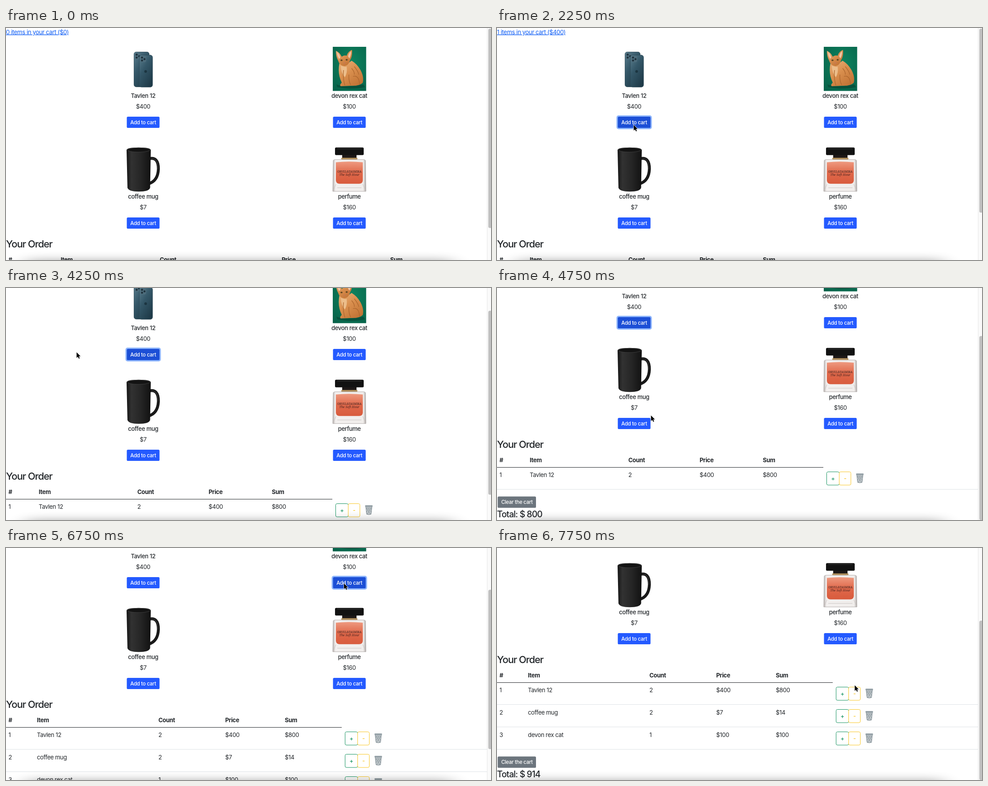
Recreate the animation shown at these times as an HTML page. Size 1082 by 518 pixels, loop 8000 ms.

```html
<!DOCTYPE html>
<html lang="en">
<head>
<meta charset="utf-8">
<title>Shop cart</title>
<style>
  html, body { margin: 0; width: 100%; height: 100%; overflow: hidden; background: #fff; }
  svg { display: block; }
  text { font: 13.1px Inter, sans-serif; letter-spacing: -.028em; fill: #212529; }
  .mid { text-anchor: middle; }
  .item { font-weight: 500; }
  .head { font-weight: 700; }
  .link { fill: #0d5cf5; text-decoration: underline; }
  .label { font-size: 11.5px; font-weight: 500; fill: #fff; text-anchor: middle; }
  .title { font-size: 22px; font-weight: 550; letter-spacing: -.05em; }
  .total { font-size: 19.4px; font-weight: 550; letter-spacing: -.045em; }
  .brand { font: 6.4px "Noto Serif", serif; letter-spacing: 0; fill: #3c2320; text-anchor: middle; }
  .script { font: italic 7px "Noto Serif", serif; letter-spacing: 0; fill: #4a2420; text-anchor: middle; }
</style>
</head>
<body>
<svg id="stage" width="1082" height="518" viewBox="0 0 1082 518">
  <defs>
    <linearGradient id="phoneFill" x2=".7" y2="1">
      <stop stop-color="#5a7d8d"/><stop offset=".45" stop-color="#345768"/><stop offset="1" stop-color="#1f3b49"/>
    </linearGradient>
    <radialGradient id="wall" cx=".55" cy=".4" r=".8">
      <stop stop-color="#0e8560"/><stop offset="1" stop-color="#066048"/>
    </radialGradient>
    <linearGradient id="fur" x2=".7" y2="1">
      <stop stop-color="#e9b27b"/><stop offset=".5" stop-color="#d98f4e"/><stop offset="1" stop-color="#c27436"/>
    </linearGradient>
    <linearGradient id="mugFill">
      <stop stop-color="#151515"/><stop offset=".2" stop-color="#323232"/>
      <stop offset=".6" stop-color="#252525"/><stop offset="1" stop-color="#111"/>
    </linearGradient>
    <linearGradient id="glass">
      <stop stop-color="#b5afad"/><stop offset=".08" stop-color="#f3f0ef"/>
      <stop offset=".92" stop-color="#f0edeb"/><stop offset="1" stop-color="#aaa5a3"/>
    </linearGradient>
    <linearGradient id="liquid" x2="0" y2="1">
      <stop stop-color="#ee9a80"/><stop offset=".5" stop-color="#e0694b"/><stop offset="1" stop-color="#d85b3d"/>
    </linearGradient>
    <filter id="blur" x="-20%" y="-200%" width="140%" height="500%"><feGaussianBlur stdDeviation="22 10"/></filter>

    <g id="phone">
      <rect x="16.500" y="11.500" width="34" height="78" rx="5" fill="url(#phoneFill)" stroke="#2b4754" stroke-width=".8"/>
      <rect x="18.500" y="14" width="13" height="14" rx="4" fill="#4d6c7b"/>
      <g fill="#1d303b"><circle cx="22.500" cy="17.500" r="2.300"/><circle cx="22.500" cy="24" r="2.300"/><circle cx="28" cy="21" r="2.300"/></g>
      <rect x="28.500" y="18.500" width="29.500" height="71.500" rx="5" fill="url(#phoneFill)" stroke="#2b4754" stroke-width=".8"/>
      <rect x="30.500" y="20.500" width="13" height="14" rx="4" fill="#4d6c7b"/>
      <g fill="#1d303b"><circle cx="34.500" cy="24" r="2.300"/><circle cx="34.500" cy="30.500" r="2.300"/><circle cx="40" cy="27.500" r="2.300"/></g>
      <circle cx="42.500" cy="55" r="3" fill="#1c3541"/>
    </g>

    <g id="cat">
      <rect width="74.500" height="98.500" fill="url(#wall)"/>
      <path d="M8 84 Q30 92 68 84 L72 90 Q40 97 10 90Z" fill="#07523d"/>
      <path d="M15 36 Q30 42 42 31 Q54 38 62 52 Q70 67 67 80 Q60 88 40 87 L18 88 Q14 86 20 80 Q10 60 15 36Z" fill="url(#fur)"/>
      <path d="M18 42 Q28 46 31 44 Q33 58 27 68 Q18 58 18 42Z" fill="#ecbd8a"/>
      <path d="M24 52 Q22 70 27 86 M36 62 Q35 76 40 85 M45 66 Q58 62 60 84 M48 44 Q57 55 58 62 M42 48 Q49 56 48 62" fill="none" stroke="#ad662e" stroke-width="1.300"/>
      <path d="M7 9 Q15 12 20 22 Q25 18 31 20 Q34 10 43 7 Q44 22 39 29 Q36 41 26 43 Q15 42 12 31 Q7 22 7 9Z" fill="url(#fur)"/>
      <path d="M9.500 12 Q15 16 17 24 L14 27 Q10 20 9.500 12Z M41 10 Q36 13 34 21 L37 26 Q41 20 41 10Z" fill="#f0c6a7"/>
      <ellipse cx="19.500" cy="30" rx="2.400" ry="1.800" fill="#5b4420"/>
      <ellipse cx="31" cy="29" rx="2.400" ry="1.800" fill="#5b4420"/>
      <path d="M24 35 L28 35 L26 38Z" fill="#c6755e"/>
    </g>

    <g id="mug">
      <path d="M50 25 Q71 20 71 48 Q70 75 49 81" fill="none" stroke="#191919" stroke-width="6.500"/>
      <path d="M55 24.500 Q70 24 70 48" fill="none" stroke="#444"/>
      <path d="M0 6 Q0 0 27 0 Q54 0 54 6 L52.500 90 Q50 98.500 27 98.500 Q5 98.500 2 90Z" fill="url(#mugFill)"/>
      <ellipse cx="27" cy="5.500" rx="25.500" ry="4.800" fill="#131313" stroke="#444" stroke-width=".8"/>
    </g>

    <g id="perfume">
      <rect x="21" y="15" width="32" height="13" fill="#1d1817"/>
      <rect x="19" y="23" width="36" height="4" rx="1" fill="#b4925c"/>
      <rect x="5" width="64" height="17" rx="2.500" fill="#121212"/>
      <path d="M10 3 H64" stroke="#3a3a3a"/>
      <path d="M1 29 Q2 27 6 27 H68 Q72 27 73 29 L74 98 H0Z" fill="url(#glass)" stroke="#a49e9c" stroke-width=".8"/>
      <path d="M7 33 Q37 30 67 33 V74 Q66 81 59 81 H15 Q8 81 7 74Z" fill="url(#liquid)"/>
      <path d="M7 82 L1 97 M67 82 L73 97 M10 90 H64" stroke="#cbc5c3" fill="none"/>
      <text class="brand" x="37" y="56">ORVEL&amp;TASMIRA</text>
      <text class="script" x="37" y="63">The Soft Hour</text>
    </g>

    <g id="bin">
      <path d="M1.500 3 H15.500 L13.500 20 Q8.500 22 3.500 20Z" fill="#c3cacd" stroke="#77858c"/>
      <path d="M3 5 L12 20 M7 5 L14 16 M11 5 L14.500 10 M14 5 L5 20 M10 5 L3 16 M6 5 L2.500 10" stroke="#77858c" stroke-width=".8"/>
      <rect width="17" height="3.500" rx="1.500" fill="#96a2a8"/>
    </g>
  </defs>

  <g id="page"></g>
  <rect x="45" y="518" width="950" height="30" fill="#000" opacity=".3" filter="url(#blur)"/>
  <rect x="1074" width="8" height="518" fill="#fafafa"/>
  <path d="M1073.500 0 V518" stroke="#e6e6e6"/>
  <rect id="thumb" x="1076" width="9" rx="3.500" fill="#c1c1c1"/>
  <path id="cursor" d="M0 0 V12.500 L2.900 9.900 L5 14.300 L7 13.400 L5 9.100 H8.800Z" fill="#000" stroke="#fff" stroke-width="1.400" paint-order="stroke"/>
</svg>

<script>
const LOOP = 8000, VIEW = 518, ROW = 50;
const byId = id => document.getElementById(id);

const products = [
  { name: 'Tavlen 12', price: 400, art: 'phone', x: 306, y: 42 },
  { name: 'devon rex cat', price: 100, art: 'cat', x: 766, y: 42 },
  { name: 'coffee mug', price: 7, art: 'mug', x: 306, y: 266.7 },
  { name: 'perfume', price: 160, art: 'perfume', x: 766, y: 266.7 }
];
const [PHONE, CAT, MUG] = [0, 1, 2];

// Column starts for item, count, price, sum and the end of the header rule, by row count
const columns = [
  [122, 343, 615, 857, 1073],
  [73, 293, 452, 593, 728],
  [72, 315, 469, 606, 737],
  [69, 340, 489, 622, 749]
];

const pointer = [ // time, x, y
  [500, 254, 214], [750, 284, 215], [1000, 305, 216.5],
  [3500, 286, 207], [3750, 215, 172], [4000, 157.5, 143.5],
  [4500, 245, 215], [4750, 343.5, 284.5], [5000, 318, 296], [5250, 311, 300],
  [5750, 340, 285], [6000, 530, 190], [6250, 733.5, 87.5], [6500, 754, 79],
  [7000, 700, 125], [7250, 620.5, 180.5], [7500, 710, 243], [7750, 798, 306.5]
];
const clicks = [[2250, PHONE], [2750, PHONE], [5250, MUG], [5500, MUG], [6750, CAT]];
const scrolls = [[0, 0], [4250, 62], [4500, 133], [7000, 200], [7250, 241], [7500, 236], [7750, 233]];

const latest = (track, t) => track.filter(key => key[0] <= t).pop();
const text = (cls, x, y, str) => `<text class="${cls}" x="${x}" y="${y}">${str}</text>`;
const rule = (y, end, color) => `<path d="M0 ${y}.5 H${end}" stroke="${color}"/>`;

function button(x, top, focused) {
  const y = Math.round(top);
  const ring = focused
    ? `<rect x="${x - 39.5}" y="${y - 3}" width="79" height="31" rx="5" fill="#8fb6fc"/>` : '';
  return ring + `<rect x="${x - 36.5}" y="${y}" width="73" height="25" rx="2.6" fill="${focused ? '#1c4fd6' : '#245aff'}"/>`
    + text('label', x, y + 16.8, 'Add to cart');
}

function card(p, focused) {
  return `<use href="#${p.art}" x="${p.x - 37}" y="${p.y}"/>`
    + text('item mid', p.x, p.y + 114, p.name)
    + text('mid', p.x, p.y + 138, '$' + p.price)
    + button(p.x, p.y + 156, focused);
}

function outlined(x, y, width, color, sign) {
  return `<rect x="${x + .5}" y="${y + .5}" width="${width}" height="29.5" rx="3" fill="none" stroke="${color}"/>`
    + `<text class="item mid" x="${x + width / 2 + .5}" y="${y + 20}" style="fill:${color}">${sign}</text>`;
}

function orderRow([product, count], i, cols) {
  const { name, price } = products[product];
  const y = 555 + i * ROW, end = cols[4];
  const cells = [name, count, '$' + price, '$' + price * count];
  return text('', 5.5, y, i + 1)
    + cells.map((cell, c) => text('', cols[c], y, cell)).join('')
    + outlined(end + 7, y - 12, 28, '#14925f', '+')
    + outlined(end + 35, y - 12, 26, '#f9c51f', '-')
    + `<use href="#bin" x="${end + 73}" y="${y - 8}"/>`
    + rule(y + 27, 1073, '#dee2e6');
}

function pageMarkup(cart, focus) {
  const rows = [...cart], cols = columns[rows.length];
  const items = rows.reduce((n, [, count]) => n + count, 0);
  const sum = rows.reduce((n, [p, count]) => n + count * products[p].price, 0);
  const below = 548 + rows.length * ROW;
  return text('link', 0, 13.6, `${items} items in your cart ($${sum})`)
    + products.map((p, i) => card(p, i === focus)).join('')
    + text('title', 0, 490, 'Your Order')
    + text('head', 5.5, 522, '#')
    + ['Item', 'Count', 'Price', 'Sum'].map((h, i) => text('head', cols[i], 522, h)).join('')
    + rule(533, cols[4], '#212529')
    + rows.map((row, i) => orderRow(row, i, cols)).join('')
    + `<rect x="1.5" y="${below + .5}" width="85.5" height="25.3" rx="2.6" fill="#6c757d"/>`
    + text('label', 44.5, below + 17.3, 'Clear the cart')
    + text('total', 0, below + 47, `Total: $ ${sum}`);
}

function draw(t) {
  const done = clicks.filter(c => c[0] <= t), cart = new Map();
  for (const [, p] of done) cart.set(p, (cart.get(p) || 0) + 1);
  const scroll = latest(scrolls, t)[1];
  const page = byId('page');
  page.innerHTML = pageMarkup(cart, done.length ? done[done.length - 1][1] : -1);
  page.setAttribute('transform', `translate(0 ${-scroll})`);

  const height = 601 + cart.size * ROW;
  const size = VIEW * VIEW / height;
  const top = Math.min(scroll * VIEW / height + 1.5, VIEW - size + 2);
  byId('thumb').setAttribute('y', top);
  byId('thumb').setAttribute('height', Math.min(size - 1.5, VIEW - top));

  const at = latest(pointer, t);
  byId('cursor').setAttribute('visibility', at ? 'visible' : 'hidden');
  if (at) byId('cursor').setAttribute('transform', `translate(${at[1]} ${at[2]})`);
}

let shown = -1;
const start = performance.now();
function tick() {
  const step = Math.floor((performance.now() - start) % LOOP / 250);
  if (step !== shown) draw((shown = step) * 250);
  requestAnimationFrame(tick);
}
tick();
</script>
</body>
</html>
```
